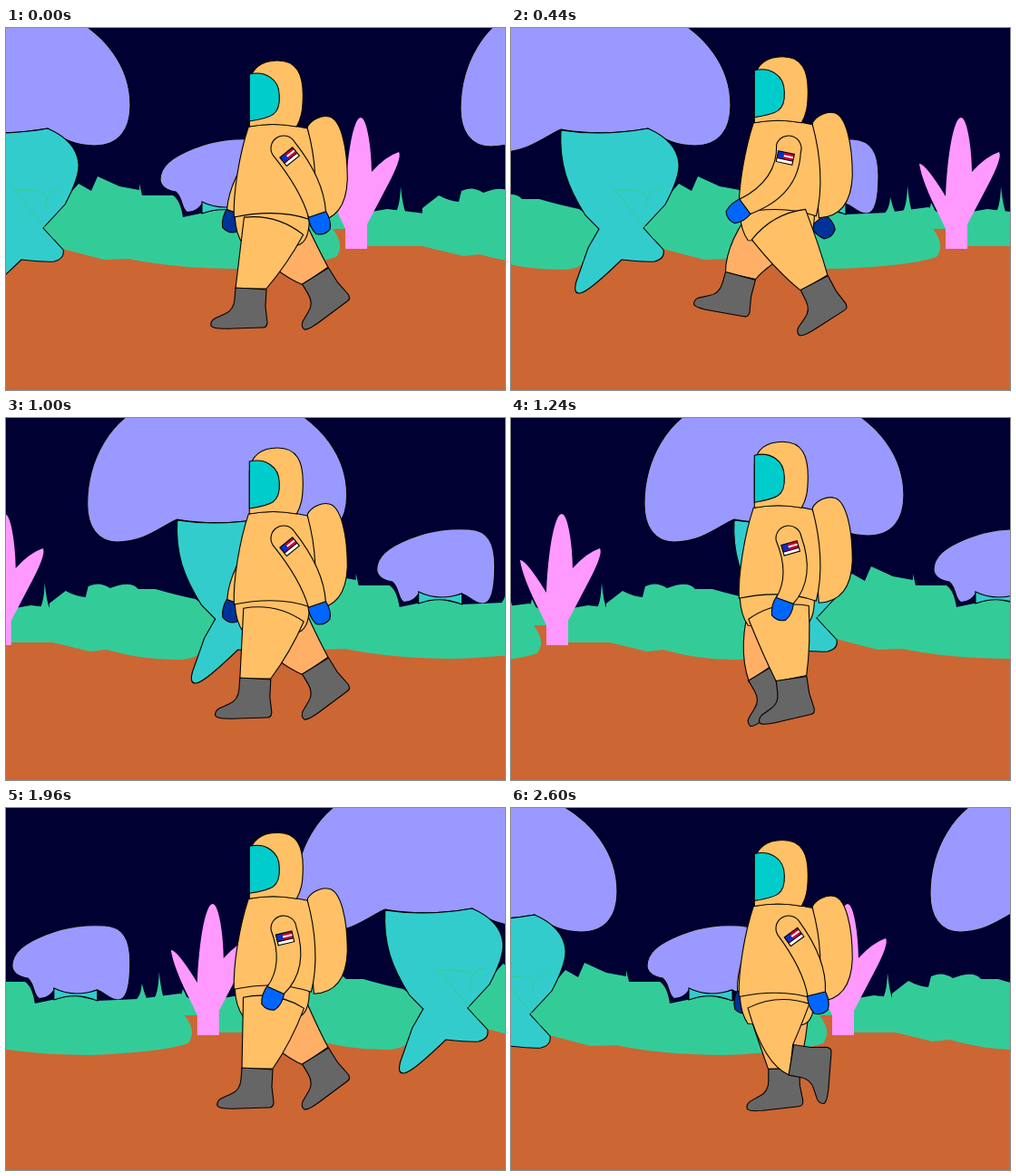
These frames come from a looping animation (550x400 px, 2640 ms). An HTML page with a canvas:

```html
<!DOCTYPE html>
<html>
<head>
<meta charset="utf-8">
<style>
html, body { margin: 0; width: 100%; height: 100%; overflow: hidden; background: #003; }
canvas { display: block; }
</style>
</head>
<body>
<canvas id="stage" width="550" height="400"></canvas>
<script>
const ctx = document.getElementById('stage').getContext('2d');
const FRAME = 40, LOOP = 2640, STRIDE = 940, TAU = Math.PI * 2;
const SUIT = '#ffc066', FAR_SUIT = '#ffb066', PURPLE = '#9999ff', TEAL = '#33cccc', GREEN = '#33cc99', SOIL = '#cc6633';

function paint(d, fill, stroke) {
  const path = new Path2D(d);
  if (fill) { ctx.fillStyle = fill; ctx.fill(path); }
  if (stroke) { ctx.strokeStyle = stroke; ctx.lineWidth = 1.1; ctx.stroke(path); }
}

function at(x, y, angle, draw) {
  ctx.save();
  ctx.translate(x, y);
  ctx.rotate(angle);
  draw();
  ctx.restore();
}

const offset = (x, y, angle, w) => [x + w * Math.cos(angle), y + w * Math.sin(angle)];
const bump = (v, centre, width) => Math.exp(-(((v - centre) / width) ** 2));
const smooth = (v, start, length) => {
  const k = Math.max(0, Math.min(1, (v - start) / length));
  return k * k * (3 - 2 * k);
};

function tile(x, y) {
  at(x, y, 0, () => {
    // distant small mushroom
    paint('M170 168C170 153 182 143 207 133C232 123 252 122 272 123C292 124 300 138 300 163C300 193 295 205 287 205C277 205 272 196 263 194Q237 205 217 193C212 201 205 204 199 203C193 198 195 188 187 181Q171 178 170 168Z', PURPLE, '#000');

    // soil and hedge with a few tall blades
    paint('M355 222H397V260H355Z', SOIL);
    paint('M-191 205L-173 191Q-162 197-151 198L-148 186Q-136 180-124 188Q-101 179-93 189L-74 189Q-50 196-30 200L0 222L60 195L80 172L94 180L101 164L125 175L147 179V172L150 185H184Q192 190 195 209L238 200L264 206L309 204L355 198L374 208L420 200L462 205V241H397V222H360Q374 240 364 253Q335 263 255 266Q190 266 135 255L108 256L62 244L-16 249Q-24 266-46 267Q-86 268-128 256L-146 258L-191 247Z', GREEN);
    for (const [bx, height] of [[313, 18], [332, 31], [358, 12], [435, 30]])
      paint(`M${bx - 8} 206Q${bx - 1} 202 ${bx} ${205 - height}Q${bx + 2} 196 ${bx + 6} 206Z`, GREEN);
    paint('M216 192Q238 203 264 194L264 206Q240 196 216 205Z', TEAL, '#000');

    // large mushroom
    paint('M-75-18C-125-2-149 48-149 95C-149 120-138 137-116 137C-86 137-68 120-50 112Q-5 120 46 111Q70 130 97 130C125 130 137 112 137 85C137 45 112 5 60-18Z', PURPLE, '#000');
    paint('M-50 113C-52 150-43 175-23 207L-8 222L-20 243L-33 280Q-37 294-29 293Q-20 292 17 256Q45 259 53 258Q65 255 63 245L41 221L65 195Q81 165 80 150Q78 125 46 111Q-5 120-50 113Z', TEAL, '#000');
    paint('M8 180Q25 177 43 182M10 180L53 233M44 198Q43 178 60 177', null, GREEN);

    // pink plant
    paint('M345 150Q352 150 374 186C376 140 383 99 391 99C398 99 403 135 403 159Q418 142 433 137Q437 143 420 175L398 217V244H374V222L367 207Q348 170 345 150Z', '#ff99ff');
  });
}

// First half of a stride: foot on the ground. Second half: foot swings forward.
function legPose(phase) {
  const p = phase % 1;
  if (p < .5) {
    const s = 2 * p, back = s ** 1.3;
    return { ax: 270 + 70 * back, ay: 288 - 14 * s ** 12, tilt: -65 * Math.max(0, s - .46), kx: 284 + 36 * back, ky: 256 };
  }
  const u = 2 * p - 1, forward = smooth(u, .36, .42), lift = bump(u, .52, .08);
  return {
    ax: 341 - 88 * forward,
    ay: 274 + 8 * bump(u, .61, .1),
    tilt: -35 + 47 * smooth(u, .55, .4) - 50 * lift,
    kx: 320 - 60 * forward,
    ky: 256 + 12 * lift - 8 * forward
  };
}

function leg(phase, hipY, fill) {
  const { ax, ay, tilt, kx, ky } = legPose(phase);
  const hipX = 295, boot = tilt * Math.PI / 180;
  const hip = Math.atan2(hipX - kx, ky - hipY), knee = (hip + boot) / 2;
  const top = offset(hipX, hipY, hip - Math.PI / 2, 14);
  paint(`M${offset(hipX, hipY, hip, -34)}Q${top} ${offset(hipX, hipY, hip, 34)}` +
    `Q${offset(kx, ky, knee, 27)} ${offset(ax, ay, boot, 17)}` +
    `L${offset(ax, ay, boot, -17)}Q${offset(kx, ky, knee, -27)} ${offset(hipX, hipY, hip, -34)}Z`, fill, '#000');
  at(ax, ay, boot, () =>
    paint('M-17-1L-18 12Q-19 24-29 28L-40 33Q-45 36-44 41Q-42 45-20 44L13 43Q18 43 18 37L16 20L17 1Z', '#666', '#000'));
}

function arm(sx, ex, ey, wx, wy, glove) {
  const sy = 133;
  const upper = Math.atan2(sx - ex, ey - sy), lower = Math.atan2(ex - wx, wy - ey);
  const side = sign => {
    const s = offset(sx, sy, upper, 14 * sign), w = offset(wx, wy, lower, 10 * sign);
    const e = offset(ex, ey, (upper + lower) / 2, 13 * sign);
    return [s, e.map((v, i) => 2 * v - (s[i] + w[i]) / 2), w];
  };
  const [sl, el, wl] = side(-1), [sr, er, wr] = side(1);
  at(wx, wy, lower, () =>
    paint('M-10-2Q-13 10-8 20Q0 25 8 20Q13 12 10-1Z', glove, '#000'));
  paint(`M${sl}Q${el} ${wl}L${wr}Q${er} ${sr}A14 14 0 0 0 ${sl}Z`, SUIT, '#000');
  return upper;
}

function flag(x, y, angle) {
  at(x, y, angle, () => {
    paint('M-9-6H9V6H-9Z', '#fff');
    paint('M-9-6H9V-3H-9ZM-9-1H9V2H-9Z', '#cc0033');
    paint('M-9-6H-2V1H-9Z', '#0033cc');
    paint('M-9-6H9V6H-9ZM-9 2H9', null, '#000');
  });
}

function astronaut(t) {
  const turn = TAU * t / LOOP, phase = t / STRIDE;
  const bob = -3.5 + 3 * Math.cos(3 * turn) + 4.3 * Math.cos(turn - .95);
  const hipY = 218 + bob * .4;

  // The arm swings back and forth twice, slowing down towards the end.
  const swing = (1 - Math.cos(3.83 * Math.PI * Math.sin(turn / 4) ** 1.1)) / 2;
  const shoulder = 306, ex = 331 - 39 * swing, ey = 171, wx = 343 - 89 * swing, wy = 206 - 9 * swing;

  arm(596 - shoulder, 596 - ex, ey, 596 - wx, 410 - wy, '#003399');
  leg(phase + .5, hipY, FAR_SUIT);
  at(-.7, bob, 0, () => {
    paint('M333 107C338 98 350 94 357 96C370 99 377 130 377 165C376 193 365 211 340 212Z', SUIT, '#000');
    paint('M253 190V207Q254 226 262 237L322 238Q334 235 335 212V190Z', SUIT, '#000');
    paint('M268 107Q297 101 333 109C342 142 345 180 337 210Q300 197 252 207C251 180 258 137 268 107Z', SUIT, '#000');
    paint('M269 60C270 42 283 34 300 34C322 34 328 50 328 72C328 90 326 98 321 107Q295 102 269 107Z', SUIT, '#000');
    paint('M269 49C286 45 302 54 302 73C303 94 294 97 269 101Z', '#00cccc', '#000');
  });
  leg(phase, hipY, SUIT);
  const tilt = arm(shoulder, ex, ey, wx, wy, '#0066ff');
  flag(shoulder - 12 * Math.sin(tilt), 133 + 11 * Math.cos(tilt), tilt - .1);
}

function draw(now) {
  const t = Math.floor(now % LOOP / FRAME) * FRAME;
  const scroll = Math.min(t / FRAME, 64) * 9.547;
  paint('M0 0H550V400H0Z', '#000033');
  paint('M0 240H550V400H0Z', SOIL);
  tile(scroll + 650, -6);
  tile(scroll - 631, 7);
  tile(scroll, 0);
  astronaut(t);
  requestAnimationFrame(draw);
}
requestAnimationFrame(draw);
</script>
</body>
</html>
```
